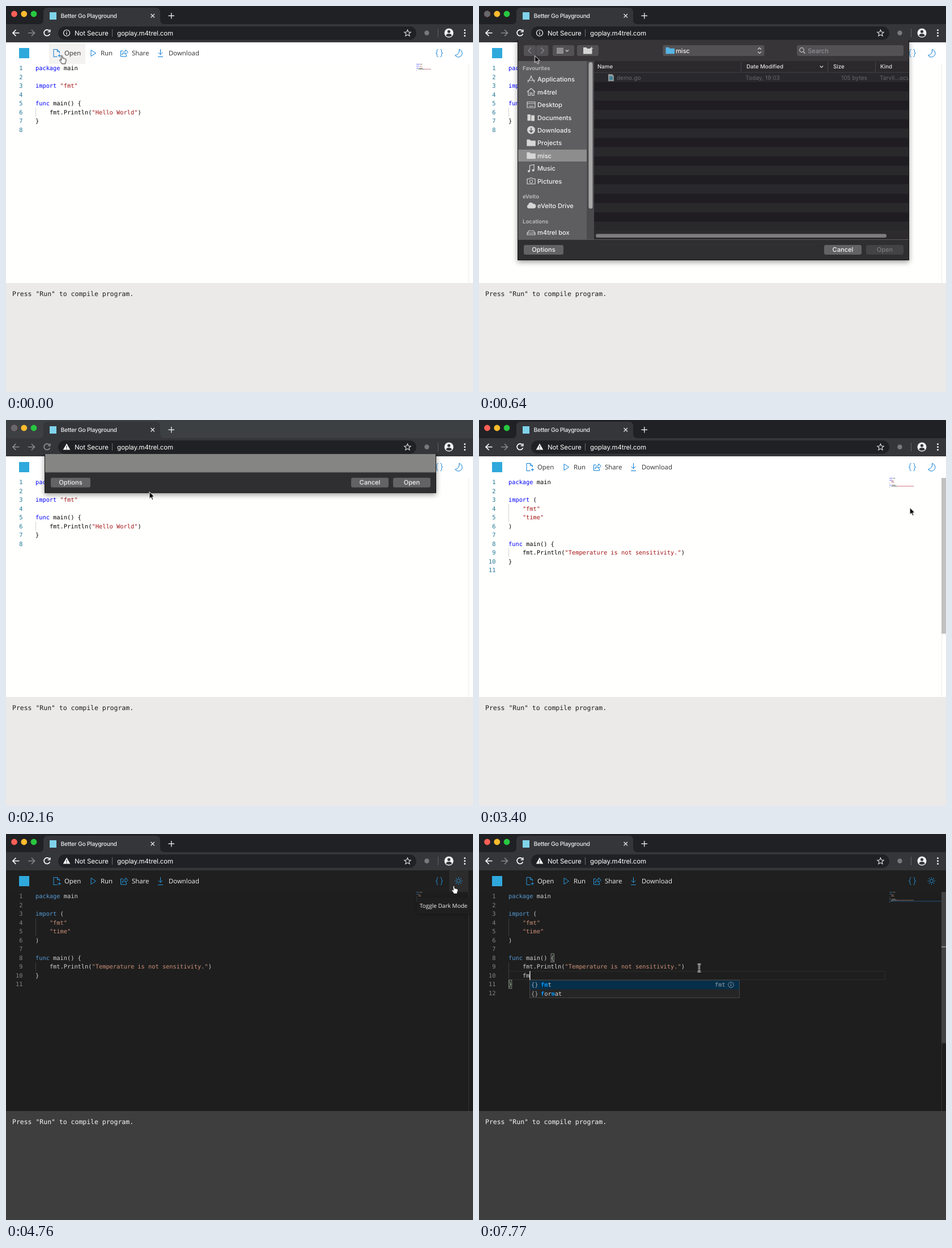
These frames come from a looping animation (824x680 px, 8000 ms). An HTML page:

```html
<!DOCTYPE html>
<html lang="en">
<head>
<meta charset="utf-8">
<title>Playground</title>
<style>
html, body { margin: 0; width: 824px; height: 680px; overflow: hidden; }
#stage { display: block; animation: theme 8s step-end infinite, focus 8s step-end infinite; }
text { font-family: Inter, Roboto, sans-serif; text-rendering: geometricPrecision; white-space: pre; }
.code { font-family: "DejaVu Sans Mono", monospace; font-size: 10.333px; fill: var(--fg); }
.kw { fill: var(--kw); }
.str { fill: var(--str); }
.num { fill: var(--num); text-anchor: end; }
.hit { fill: #0097fb; font-weight: 700; }
.out { font-family: "DejaVu Sans Mono", monospace; font-size: 11.47px; fill: var(--outFg); }
.menu { font-family: "Open Sans", "Noto Sans", sans-serif; font-size: 11.4px; fill: var(--ui); }
.tab { font-size: 10.33px; letter-spacing: -.3px; font-weight: 500; fill: #e8eaed; }
.url { font-size: 11.5px; letter-spacing: -.12px; fill: #fff; }
.item { font-size: 11.1px; font-weight: 500; fill: #f2f2f2; }
.head { font-size: 9.6px; font-weight: 600; fill: #bdbdbd; }
.col { font-size: 9.7px; font-weight: 500; fill: #e2e2e2; }
.cell { font-size: 10.2px; }
.mid { text-anchor: middle; }
.line { fill: none; stroke: var(--icon); }
.nav { fill: none; stroke: var(--nav); stroke-width: 1.7; }
.glyph { fill: none; stroke: #d6d6d6; stroke-width: 1.2; }
#sheet { animation: slide 8s cubic-bezier(.37, 0, .63, 1) infinite; }
#cursor { animation: move 8s linear infinite; }

@keyframes theme {
  0% { --bg: #fffffe; --top: #fff; --hover: #f3f2f1; --fg: #000; --kw: #00f; --str: #a31515; --num: #237893;
    --guide: #d3d3d3; --edge: #ececec; --slider: #c1c1c1; --icon: #0078d4; --ui: #323130;
    --out: #ebeae9; --outFg: #1c1c1c; }
  59.5% { --bg: #1e1e1e; --top: #1f1f1f; --hover: #2d2c2c; --fg: #d4d4d4; --kw: #569cd6; --str: #ce9178; --num: #858585;
    --guide: #404040; --edge: #343434; --slider: #434343; --icon: #2899e0; --ui: #f3f2f1;
    --out: #3e3e3e; --outFg: #f8f8f8; }
}
@keyframes focus {
  0% { --strip: #202124; --nav: #fff; }
  8.75% { --strip: #3c4043; --nav: #8d8f92; }
  29.125% { --strip: #202124; --nav: #fff; }
}
@keyframes slide {
  0%, 3.375% { transform: translateY(-400px); }
  7.375%, 24.125% { transform: none; }
  28.125%, 100% { transform: translateY(-388px); opacity: 1; }
  28.2%, 100% { transform: translateY(-410px); }
}
@keyframes move {
  0%, 8.75% { transform: translate(98.5px, 87.5px); animation-timing-function: ease-in; }
  12.375% { transform: translate(194px, 107px); animation-timing-function: ease-out; }
  16.875%, 34.375% { transform: translate(253px, 126.5px); animation-timing-function: ease-in; }
  38.5% { transform: translate(500px, 174px); }
  42.5% { transform: translate(760px, 154.5px); }
  44% { transform: translate(783px, 142px); animation-timing-function: ease-out; }
  50.75%, 60% { transform: translate(790px, 91px); animation-timing-function: ease-in; }
  63.75% { transform: translate(610px, 158px); animation-timing-function: ease-out; }
  68.875%, 100% { transform: translate(388.5px, 236px); }
}
</style>
</head>
<body>
<svg id="stage" width="824" height="680" viewBox="0 0 824 680"></svg>
<script>
// Visibility per class: alternating on and off times in ms
const spans = {
  hoverOpen: [0, 300], redOff: [300, 2330], info: [0, 1880], warn: [1880, 8000],
  firstDoc: [0, 2390], loaded: [2390, 8000], tail: [2390, 6450], longTail: [6450, 8000],
  slider: [2390, 4580, 5000, 6450], slider2: [6450, 8000],
  row9: [5740, 6450], row10: [6450, 8000], pair: [6510, 8000],
  caretEnd: [5740, 6210], caretNew: [6450, 6990], caretF: [7470, 7710], caretM: [7710, 8000],
  typeF: [7470, 8000], typeM: [7710, 8000], hints: [7710, 7770], hints2: [7770, 8000],
  hoverMoon: [4060, 4880], tip: [4290, 4940], moon: [0, 4760], sun: [4760, 8000],
  dim: [0, 750], bright: [750, 1880], picked: [1590, 1880], blank: [1880, 8000],
  openOff: [0, 1590], openBlue: [1590, 1990], openGrey: [1990, 8000],
  hand: [0, 300, 3900, 4880], arrow: [300, 2750, 3340, 3900, 4880, 4960], beam: [2750, 3340, 4960, 8000]
};
const css = Object.entries(spans).map(([name, times]) =>
  `@keyframes ${name}{0%{opacity:0}${times.map((t, i) => `${t / 80}%{opacity:${1 - i % 2}}`).join('')}}` +
  `.${name}{animation:${name} 8s step-end infinite}`).join('\n');
document.head.append(Object.assign(document.createElement('style'), { textContent: css }));

const text = (x, y, s, cls = '', more = '') => `<text x="${x}" y="${y}" class="${cls}" ${more}>${s}</text>`;
const rect = (x, y, w, h, fill, more = '') =>
  `<rect x="${x}" y="${y}" width="${w}" height="${h}" fill="${fill}" ${more}/>`;
const disc = (x, y, r, fill, more = '') => `<circle cx="${x}" cy="${y}" r="${r}" fill="${fill}" ${more}/>`;
const path = (d, cls = '', more = '') => `<path d="${d}" class="${cls}" ${more}/>`;
const group = (cls, ...parts) => `<g class="${cls}">${parts.join('')}</g>`;

// Editor
const CH = 6.22, LH = 15.5, X0 = 52, Y0 = 102;
const rowY = row => Y0 + row * LH;
const tok = (row, col, s, cls = '') =>
  text(X0 + col * CH, rowY(row) + 11.3, s, 'code ' + cls) +
  rect(724 + col * .861, Y0 + row * 1.75, s.length * .861, 1.1, `var(--${cls || 'fg'})`, 'opacity=".5"');
const nums = (from, to) => Array.from({ length: to - from + 1 }, (_, i) =>
  text(29.5, rowY(from + i - 1) + 11.3, from + i, 'code num')).join('');
const guide = (row, n = 1) => rect(X0, rowY(row), 1, n * LH, 'var(--guide)');
const mainFunc = (row, msg) =>
  tok(row, 0, 'func', 'kw') + tok(row, 5, 'main() {') + guide(row + 1) +
  tok(row + 1, 4, 'fmt.Println(') + tok(row + 1, 16, `"${msg}"`, 'str') + tok(row + 1, 18 + msg.length, ')');
const caret = (cls, row, col) => rect(X0 + col * CH - .3, rowY(row), 1.6, LH, 'var(--fg)', `class="${cls}"`);
const current = (cls, row, mark) => group(cls,
  rect(X0 + .5, rowY(row) + .5, 664, LH - 1, 'none', 'stroke="#2c2c2c"'),
  rect(724, Y0 + row * 1.75, 92, 1.5, '#264f78', 'opacity=".75"'),
  rect(816, mark, 8, 1.5, '#a0a0a0'));
const bracket = (row, col) =>
  rect(X0 + col * CH + .5, rowY(row) + .5, CH - 1, LH - 1, 'rgba(0,100,0,.1)', 'stroke="#888"');

const hintRow = (x, y, word, hits) => text(x + 3, y + 11, '{}', 'code', 'fill-opacity=".8"') +
  [...word].map((c, i) => text(x + 20 + i * CH, y + 11, c, 'code ' + (hits.includes(i) ? 'hit' : ''))).join('');
const hints = (cls, x, words) => group(cls,
  rect(x + .5, 257.5, 370, words.length * LH, '#252526', 'stroke="#454545"'),
  rect(x + 1, 258, 369, LH, '#062f4a'),
  words.map(([w, hits], i) => hintRow(x, 258 + i * LH, w, hits)).join(''),
  text(x + 327, 269, 'fmt', 'code', 'opacity=".7"'),
  disc(x + 355.5, 265.7, 4.8, 'none', 'stroke="#8b99a3"'),
  path(`M${x + 355.5} 265v3.3m0-5.6v1.2`, '', 'stroke="#a9b4bb"'));

const editor = rect(0, 64, 824, 424, 'var(--bg)') + rect(816, 102, 1, 386, 'var(--edge)') +
  current('row9', 8, 190) + current('row10', 9, 198) +
  nums(1, 8) + tok(0, 0, 'package', 'kw') + tok(0, 8, 'main') + tok(2, 0, 'import', 'kw') +
  group('firstDoc', tok(2, 7, '"fmt"', 'str'), mainFunc(4, 'Hello World'), tok(6, 0, '}')) +
  group('loaded', nums(9, 11), tok(2, 7, '('), guide(3, 2), tok(3, 4, '"fmt"', 'str'), tok(4, 4, '"time"', 'str'),
    tok(5, 0, ')'), mainFunc(7, 'Temperature is not sensitivity.')) +
  group('tail', tok(9, 0, '}')) +
  group('longTail', nums(12, 12), guide(9), tok(10, 0, '}')) +
  group('pair', bracket(7, 12), bracket(10, 0)) +
  group('typeF', tok(9, 4, 'f')) + group('typeM', tok(9, 5, 'm')) +
  caret('caretEnd', 8, 50) + caret('caretNew', 9, 4) + caret('caretF', 9, 5) + caret('caretM', 9, 6) +
  rect(816, 102, 8, 274.5, 'var(--slider)', 'class="slider"') +
  group('slider2', rect(816, 102, 8, 266.5, 'var(--slider)'), rect(816, 198, 8, 1.5, '#a0a0a0')) +
  hints('hints', 82, ['fmt', 'format', 'func', 'for', 'false', 'float32', 'float64', 'fallthrough'].map(w => [w, [0]])) +
  hints('hints2', 89, [['fmt', [0, 1]], ['format', [0, 3]]]) +
  rect(0, 488, 824, 192, 'var(--out)') + text(11, 511, 'Press "Run" to compile program.', 'out');

// Toolbar of the page
const rays = Array.from({ length: 8 }, (_, i) =>
  path('M0-4.8v-1.9', 'line', `transform="translate(798.5 82.7) rotate(${i * 45})"`)).join('');
const brace = 'c-2.4 0-2.2 1-2.2 3.2s0 3.2-2 3.2c2 0 2 1 2 3.2s-.2 3.2 2.2 3.2';
const toolbar = rect(0, 64, 824, 38, 'var(--top)') +
  rect(76, 65, 64, 37, 'var(--hover)', 'class="hoverOpen"') +
  rect(782, 64, 34, 38, 'var(--hover)', 'class="hoverMoon"') +
  rect(23, 74, 18, 18, '#2fa9dc') +
  path('M90.5 89.5h-6.5v-13h6.5l4 4v2.5M90.5 76.5v4h4M91.5 87.5h5.5M94.2 84.8v5.4', 'line') +
  path('M150 77.5l8.5 5.5-8.5 5.5z', 'line') +
  path('M206.5 79h-4v10h10v-3M205 86c.5-4 3-6.200 6-6.200v-2.800l4.200 4.200-4.200 4.300v-2.700c-2.600 0-4.500 1-6 3.200z', 'line') +
  path('M272.500 76v9.500M268.800 81.800l3.700 3.700 3.700-3.700M268 89.500h9', 'line') +
  path('M762.600 76.600' + brace, 'line') +
  path('M762.600 76.600' + brace, 'line', 'transform="matrix(-1 0 0 1 1529 0)"') +
  path('M799.500 76.500a6.800 6.800 0 1 1-7 10.500a8.500 8.500 0 0 0 7-10.500z', 'line moon') +
  group('sun', disc(798.5, 82.7, 3, 'none', 'stroke="var(--icon)"'), rays) +
  [[103, 'Open'], [167, 'Run'], [222, 'Share'], [287, 'Download']].map(([x, s]) => text(x, 87, s, 'menu')).join('') +
  group('tip', rect(726, 112, 95, 28, 'var(--top)', 'style="filter:drop-shadow(0 1px 3px #0004)"'),
    text(730, 129.7, 'Toggle Dark Mode', 'menu', 'style="font-size:10px"'));

// Browser frame
const browser = rect(0, 0, 824, 32, 'var(--strip)') + rect(0, 32, 824, 32, '#35363a') +
  path('M58 32q8 0 8-8V11q0-8 8-8h190q8 0 8 8v13q0 8 8 8z', '', 'fill="#35363a"') +
  disc(14.5, 14, 5.4, '#ff5f57') + disc(14.5, 14, 5.4, '#66686b', 'class="redOff"') +
  disc(31.8, 14, 5.4, '#febc2e') + disc(49, 14, 5.4, '#28c840') +
  rect(77, 11, 12, 13, '#7fd3ea') + text(96.5, 21, 'Better Go Playground', 'tab') +
  path('M255.500 14l6.500 6.500m0-6.500l-6.500 6.500M286.500 17.300h10.500m-5.250-5.250v10.500', '', 'stroke="#dfe1e5" stroke-width="1.4"') +
  path('M23.500 47.500H12M17.500 42l-5.500 5.500 5.500 5.500', 'nav') +
  path('M39 47.500h11.500M45 42l5.500 5.500-5.500 5.500', '', 'fill="none" stroke="#88898c" stroke-width="1.6"') +
  path('M76.500 43.800a5.300 5.300 0 1 0 .9 5.200M77.700 41.500v4h-4', 'nav') +
  rect(92, 36, 632, 23.500, '#202124', 'rx="11.750"') +
  group('info', disc(107, 47.5, 5.5, 'none', 'stroke="#fff" stroke-width="1.200"'),
    path('M107 46.800v3.700m0-6.200v1.300', '', 'stroke="#fff" stroke-width="1.300"')) +
  group('warn', path('M107 41.500l6.300 11h-12.600z', '', 'fill="#fff"'),
    path('M107 45.500v3.600m0 1v1.300', '', 'stroke="#202124" stroke-width="1.200"')) +
  text(121, 51.7, 'Not Secure', 'url') + rect(187, 41, 1, 13, '#6b6d70') +
  text(196, 51.7, 'goplay.m4trel.com', 'url') +
  path('M708.500 42l1.600 3.800 4.100.3-3.100 2.700 1 4-3.600-2.200-3.600 2.200 1-4-3.100-2.700 4.100-.3z', '', 'fill="none" stroke="#dfe1e5" stroke-width="1.100"') +
  disc(742.5, 47.5, 4.2, '#77797c') + rect(762, 40, 1, 15, '#5f6164') +
  disc(781.5, 47.5, 8, '#f1f3f4') + disc(781.5, 45, 2.6, '#35363a') +
  path('M776.500 52.500q0-3.700 5-3.700t5 3.700q-5 3-10 0z', '', 'fill="#35363a"') +
  [42.500, 47.500, 52.500].map(y => disc(809.5, y, 1.5, '#f1f3f4')).join('');

// File sheet
const button = (x, w, s, fill, ink = '#f4f4f4') =>
  rect(x, 421, w, 17, fill, 'rx="3"') + text(x + w / 2, 433.4, s, 'item mid', `style="fill:${ink}"`);
const folder = (x, y, fill) => path(`M${x} ${y}h5.500l1.500 2h8.500v9.500h-15.500z`, '', `fill="${fill}"`);
// Sidebar glyphs, drawn around their centre
const glyphs = {
  apps: path('M-6 5.500L1-6M6 5.500L-1-6M-7 2H7', 'glyph', 'stroke-width="1.500"'),
  home: path('M-7 0L0-6.500 7 0M-5-1.500V6H-1.500V1.500H1.500V6H5V-1.500', 'glyph'),
  desk: path('M-7-5H7V5H-7zM-7-2H7M-4 2.500H4', 'glyph'),
  docs: path('M-6.500-5.500H-1V5.500H-6.500zM0-4H6V6H0z', '', 'fill="#d6d6d6"'),
  down: disc(0, 0, 7, '#d6d6d6') + path('M0-4V3.500M-3 .8L0 3.800 3 .8', '', 'fill="none" stroke="#5e5e60" stroke-width="1.600"'),
  dir: folder(-7.700, -5.700, '#d6d6d6'),
  note: path('M-2.500 5V-5L5-6.500V3.500', 'glyph') + disc(-4, 5, 2, '#d6d6d6') + disc(3.5, 3.5, 2, '#d6d6d6'),
  shot: path('M-7-4H-3L-2-5.500H2L3-4H7V5H-7z', 'glyph') + disc(0, .5, 2.8, 'none', 'stroke="#d6d6d6"'),
  cloud: path('M-5 5a3.500 3.500 0 0 1 0-6.500A4.600 4.600 0 0 1 3.500-3A4 4 0 0 1 5 5z', '', 'fill="#d6d6d6"'),
  disk: path('M-7 1L-4-3H4L7 1V4H-7zM-7 1H7', 'glyph')
};
const places = [[129, 'Applications', 'apps'], [151.5, 'm4trel', 'home'], [174, 'Desktop', 'desk'],
  [196.5, 'Documents', 'docs'], [218.5, 'Downloads', 'down'], [241, 'Projects', 'dir'], [263.5, 'misc', 'dir'],
  [286, 'Music', 'note'], [308.5, 'Pictures', 'shot'], [351.5, 'eVelto Drive', 'cloud'], [399, 'm4trel box', 'disk']];
const sidebar = rect(69, 97, 121, 314, '#5e5e60') + rect(190, 97, 13, 314, '#4b4b4d') +
  rect(193.500, 99, 7, 258, '#a8a8a8', 'rx="3.500"') + rect(69, 253, 121, 21, '#8d8d8d') +
  [[113.3, 'Favourites'], [338.5, 'eVelto'], [383.3, 'Locations']].map(([y, s]) => text(77, y, s, 'head')).join('') +
  places.map(([y, s, g]) => `<g transform="translate(92 ${y})">${glyphs[g]}</g>` + text(103, y + 4, s, 'item')).join('');

const cells = [[243, 'demo.go'], [470, 'Today, 19:03'], [639, '105 bytes'], [707, 'Tarvil...ocu']];
const fileRow = (cls, fill) => group(cls, cells.map(([x, s]) => text(x, 130.3, s, 'cell', `fill="${fill}"`)).join(''));
const stripes = Array.from({ length: 17 }, (_, i) =>
  rect(203, 117.500 + i * 16.400, 555, 16.400, i % 2 ? '#1f1d21' : '#29282b')).join('');
const list = rect(203, 97, 555, 20.500, '#2b292c') + stripes +
  [[209, 'Name'], [472, 'Date Modified'], [625, 'Size'], [708, 'Kind']].map(([x, s]) => text(x, 109.8, s, 'col')).join('') +
  [462, 615, 699].map(x => rect(x, 98, 1, 18, '#454347')).join('') + rect(203, 116.500, 555, 1, '#454347') +
  path('M601.500 105.500l2.800 2.800 2.800-2.800', 'glyph') +
  rect(203, 118, 555, 16, '#0a58d0', 'class="picked"') +
  path('M228 120h7l3 3v9.500h-10z', '', 'fill="#8f9699"') + rect(230, 124, 6, 6, '#3f8296') +
  fileRow('dim', '#69676b') + fileRow('bright', '#e6e6e6') +
  rect(203, 397, 555, 14, '#2d2b2e') + rect(206, 401.500, 513, 6.500, '#7d7d7d', 'rx="3.250"');

const tools = [[79, 21.5], [101, 21.5], [130, 38], [173, 38], [324.5, 179], [561, 188]]
  .map(([x, w]) => rect(x, 69, w, 19, '#535154', 'rx="3"')).join('') +
  path('M92 73.500l-5 5 5 5M109.500 73.500l5 5-5 5', '', 'fill="none" stroke="#8a888b" stroke-width="1.300"') +
  path('M137 74.500h12m-12 2.700h12m-12 2.700h12m-12 2.700h12M153 77.500l2.500 2.500 2.500-2.500', 'glyph') +
  folder(184, 73, '#d6d6d6') + path('M198.500 72v5m-2.500-2.500h5', 'glyph') +
  folder(329.500, 72.800, '#56b4e4') + text(347, 82.5, 'misc', 'item') +
  path('M492 76.500l3-3 3 3M492 80.500l3 3 3-3', 'glyph') +
  disc(569.5, 77.5, 3.8, 'none', 'stroke="#c9c9c9" stroke-width="1.200"') + path('M572.300 80.500l3.200 3.200', 'glyph') +
  text(580, 82.5, 'Search', 'item', 'style="fill:#98969a;font-weight:400"');

const sheet = `<clipPath id="below"><path d="M30 60.500H794V480H30z"/></clipPath>
  <clipPath id="inner"><path d="M69 60H758V447H69z"/></clipPath>
  <g clip-path="url(#below)"><g id="sheet">
  ${rect(68.5, 58, 690, 389.5, '#2f2e30', 'stroke="#151515" style="filter:drop-shadow(0 3px 5px #0006)"')}
  <g clip-path="url(#inner)">${rect(69, 58, 689, 39, '#373538')}${tools}${sidebar}${list}
  ${group('blank', rect(69, 58, 689, 39, '#302e31', 'opacity=".75"'), rect(69, 97, 689, 314, '#858584'))}
  ${rect(69, 411, 689, 1, '#5a595b')}
  ${button(79, 70, 'Options', '#636264')}${button(609, 66, 'Cancel', '#636264')}
  ${group('openOff', button(683, 66, 'Open', '#434244', '#7b7a7c'))}
  ${group('openBlue', button(683, 66, 'Open', '#1a6fee'))}
  ${group('openGrey', button(683, 66, 'Open', '#636264'))}
  </g></g></g>`;

// Pointer shapes, hot spot at the origin
const beam = 'M-2.800-6.800q2.300 0 2.800 1.500q.5-1.500 2.800-1.500M0-5.500V5.500M-2.800 6.800q2.300 0 2.800-1.500q.5 1.500 2.800 1.500M-1.800 2.500h3.600';
const cursor = `<g id="cursor">
  ${path('M0 0V12.300L2.900 9.600 4.900 14.300 7 13.400 5 8.900H8.900z', 'arrow', 'fill="#000" stroke="#fff" stroke-width="1"')}
  ${path('M-1.200 1.500q0-1.500 1.200-1.500t1.300 1.500l.6 3.500q1.400-.8 2 .3q1.400-.6 2 .6q1.600-.3 1.600 1.400q0 3-1.300 5v2h-6.200q-.5-2-2.200-3.800q-2.200-2.600-1.300-3.300q1-.8 2.700 1z', 'hand', 'fill="#fff" stroke="#111" stroke-width="1"')}
  ${group('beam', path(beam, '', 'fill="none" stroke="#fff" stroke-width="2.600"'), path(beam, '', 'fill="none" stroke="#111" stroke-width="1"'))}
  </g>`;

document.getElementById('stage').innerHTML = editor + toolbar + browser + sheet + cursor;
</script>
</body>
</html>
```
